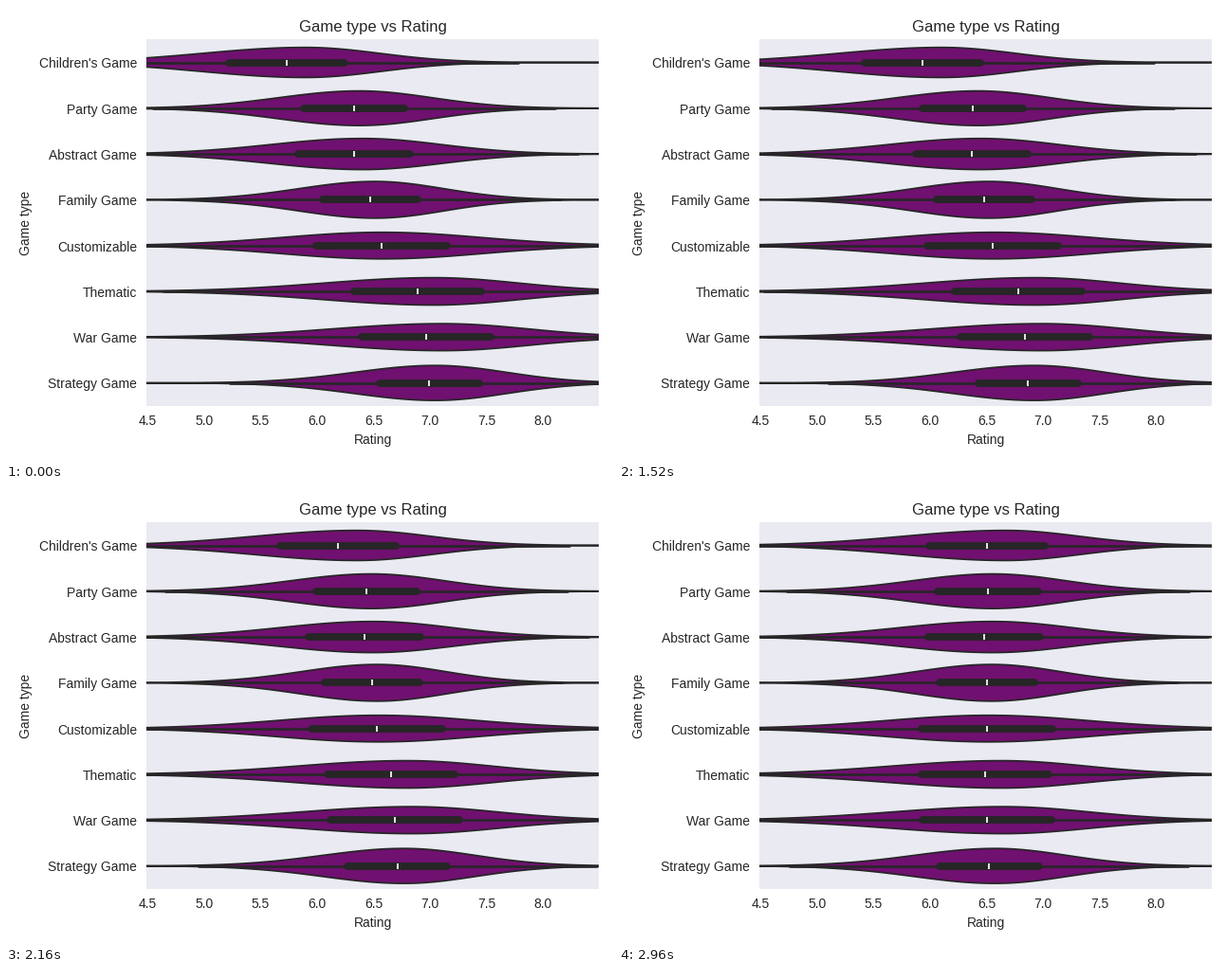
Animation of 640 by 480 pixels, one loop 5000 ms. Source, as a matplotlib script:

```python
import numpy as np
import matplotlib.pyplot as plt
from matplotlib.animation import FuncAnimation
from matplotlib.patches import Polygon

W, H, DPI = 640, 480, 100
LEFT, RIGHT, TOP, BOTTOM = 148, 625, 35.4, 421.8
CX, CY = (LEFT + RIGHT) / 2, (TOP + BOTTOM) / 2
FRAMES, INTERVAL = 125, 40
HOLD, STEPS = 25, 49
DARK, FILL, PANEL = "#262626", "#701070", "#EAEAF2"
LW = 1.25

plt.rcParams["font.family"] = "Liberation Sans"

# Median at the start and at the end, half the box length, lean of the bell.
ROWS = {
    "Children's Game": (296, 388, 61, 0.25),
    "Party Game": (367, 389, 53, 0.08),
    "Abstract Game": (367, 385, 59, 0.12),
    "Family Game": (384, 388, 50, 0.08),
    "Customizable": (395.5, 388, 69, 0.02),
    "Thematic": (434, 386, 67, 0.2),
    "War Game": (443, 388, 68, 0.2),
    "Strategy Game": (446, 390, 52.5, 0.1),
}
SPREAD = 1.53   # bell spread in half boxes
AREA = 1480     # height times spread, the same for every violin
FENCE = 4       # half boxes from the median to a whisker's end

fig = plt.figure(figsize=(W / DPI, H / DPI), dpi=DPI, facecolor="white")
ax = fig.add_axes([LEFT / W, 1 - BOTTOM / H, (RIGHT - LEFT) / W, (BOTTOM - TOP) / H])
ax.set(xlim=(LEFT, RIGHT), ylim=(BOTTOM, TOP), facecolor=PANEL, xticks=[], yticks=[])
for spine in ax.spines.values():
    spine.set_visible(False)


def label(x, y, text, size=10, ha="center", **kw):
    fig.text(x / W, 1 - y / H, text, size=size, ha=ha, va="baseline", color=DARK, **kw)


def bell(x, mid, box, lean):
    """Bell with a wider left side, placed so that its median is at mid."""
    d = x - (mid + 1.3 * lean * box)
    side = box * np.where(d < 0, SPREAD + lean, SPREAD - lean)
    return AREA / (SPREAD * box) * np.exp(-0.5 * (d / side) ** 2)


class Violin:
    x = np.linspace(100, 680, 300)

    def __init__(self, row, name):
        self.start, self.end, self.half, self.lean = ROWS[name]
        self.y = TOP + (row + 0.5) * (BOTTOM - TOP) / len(ROWS)
        self.body = ax.add_patch(Polygon([(0, 0), (1, 1)], closed=True, fc=FILL,
                                         ec=DARK, lw=LW, zorder=1))
        self.whisker = self.line(1.5 * LW, 2)
        self.box = self.line(4.5 * LW, 3)
        self.median, = ax.plot([], [], "|", color="white", ms=4.5, mew=LW, zorder=4)
        label(138, self.y + 5.8, name, ha="right")

    def line(self, width, z):
        return ax.plot([], [], color=DARK, lw=width, solid_capstyle="round", zorder=z)[0]

    def update(self, p):
        mid, y, x = self.start + (self.end - self.start) * p, self.y, self.x
        h = bell(x, mid, self.half, self.lean)
        self.body.set_xy(np.column_stack([np.r_[x, x[::-1]], np.r_[y - h, y + h[::-1]]]))
        for line, reach in (self.whisker, FENCE), (self.box, 1):
            line.set_data([mid - reach * self.half, mid + reach * self.half], [y, y])
        self.median.set_data([mid], [y])


violins = [Violin(i, name) for i, name in enumerate(ROWS)]

for i in range(8):
    label(149.4 + 59.55 * i, 442, f"{4.5 + i / 2:.1f}")
label(CX, 27, "Game type vs Rating", size=12)
label(CX, 462, "Rating")
label(25, CY, "Game type", rotation=90, rotation_mode="anchor")


def draw(frame):
    p = np.clip((frame - HOLD) / STEPS, 0, 1)
    for v in violins:
        v.update(p)
    return []


anim = FuncAnimation(fig, draw, frames=FRAMES, interval=INTERVAL,
                     init_func=lambda: draw(0), repeat=True)
plt.show()
```
